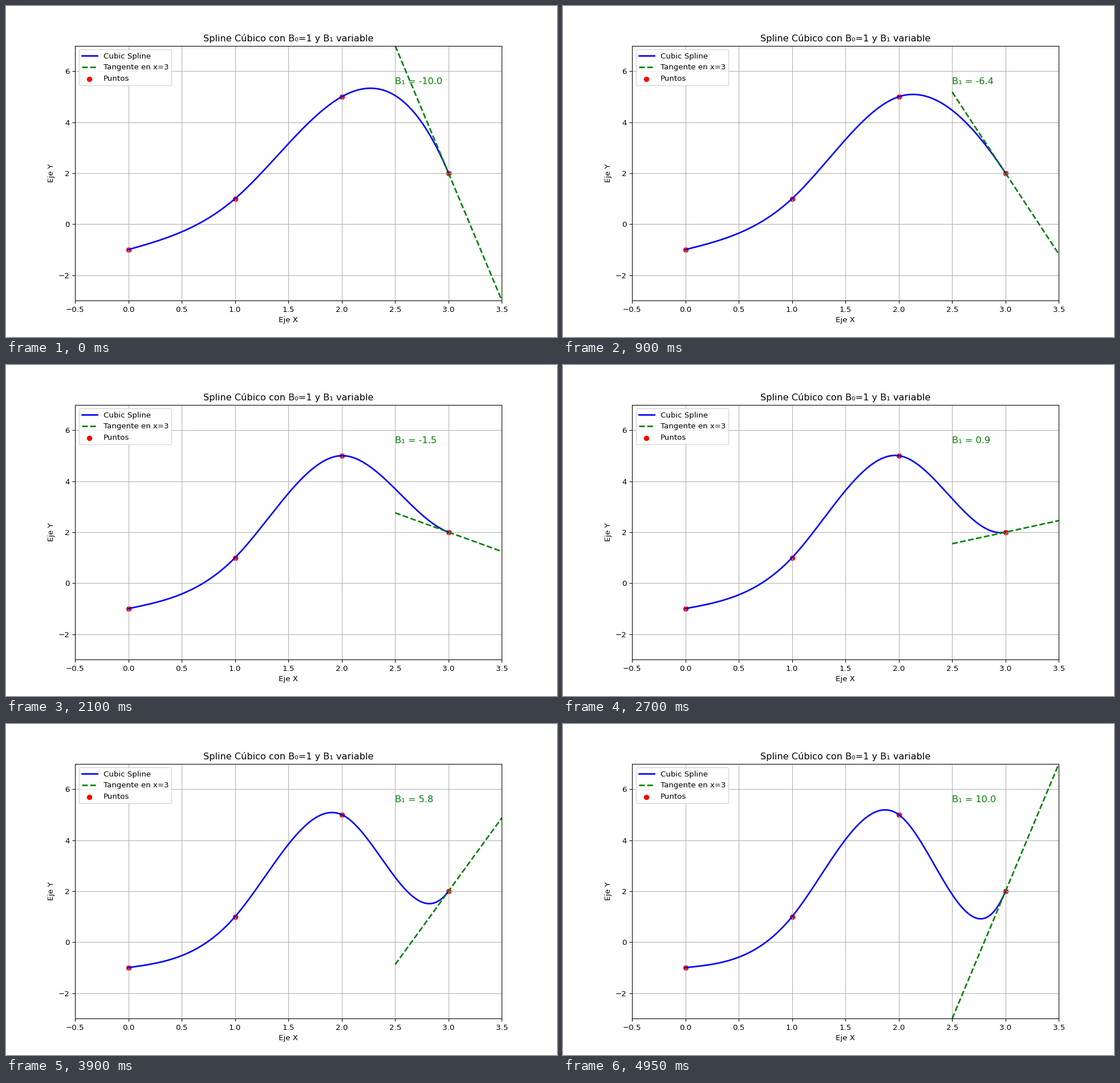
Write a matplotlib script that moves like this. It is 966 by 580 pixels and loops after 5 s.

```python
import numpy as np
import matplotlib.pyplot as plt
from matplotlib.animation import FuncAnimation

FRAMES = 100
INTERVAL = 50
KNOTS_X = np.array([0.0, 1.0, 2.0, 3.0])
KNOTS_Y = np.array([-1.0, 1.0, 5.0, 2.0])
END_SLOPES = np.linspace(-10, 10, FRAMES)

# Slope equations for unit spacing: free left end, fixed right slope.
SYSTEM = np.array([[2, 1, 0, 0], [1, 4, 1, 0], [0, 1, 4, 1], [0, 0, 0, 1]], float)

curve_x = np.linspace(0, 3, 300)
tangent_x = np.linspace(2.5, 3.5, 100)


def spline(x, end_slope):
    y = KNOTS_Y
    rhs = [3 * (y[1] - y[0]), 3 * (y[2] - y[0]), 3 * (y[3] - y[1]), end_slope]
    m = np.linalg.solve(SYSTEM, rhs)
    i = np.clip(x.astype(int), 0, 2)
    t = x - KNOTS_X[i]
    rise = y[i + 1] - y[i]
    a = m[i] + m[i + 1] - 2 * rise
    b = 3 * rise - 2 * m[i] - m[i + 1]
    return y[i] + t * (m[i] + t * (b + t * a))


plt.rcParams["font.family"] = "DejaVu Sans"
# 966 x 580 pixels; the dpi sets the size of text, dots and dashes.
fig, ax = plt.subplots(figsize=(10, 6.0042), dpi=96.6)
fig.subplots_adjust(left=0.1252)
ax.set_xlim(-0.5, 3.5)
ax.set_ylim(-3, 7)
ax.set_title("Spline Cúbico con B₀=1 y B₁ variable")
ax.set_xlabel("Eje X")
ax.set_ylabel("Eje Y")
ax.grid(True)

curve, = ax.plot([], [], "b-", lw=2, label="Cubic Spline")
tangent, = ax.plot([], [], "g--", lw=2, label="Tangente en x=3")
ax.scatter(KNOTS_X, KNOTS_Y, color="red", label="Puntos")
label = ax.text(2.5, 5.5, "", fontsize=12, color="green")
ax.legend(loc="upper left")


def update(frame):
    slope = END_SLOPES[frame]
    curve.set_data(curve_x, spline(curve_x, slope))
    tangent.set_data(tangent_x, KNOTS_Y[-1] + slope * (tangent_x - 3))
    label.set_text(f"B₁ = {slope:.1f}")
    return curve, tangent, label


anim = FuncAnimation(fig, update, frames=FRAMES, interval=INTERVAL,
                     repeat=True, repeat_delay=0)
plt.show()
```
